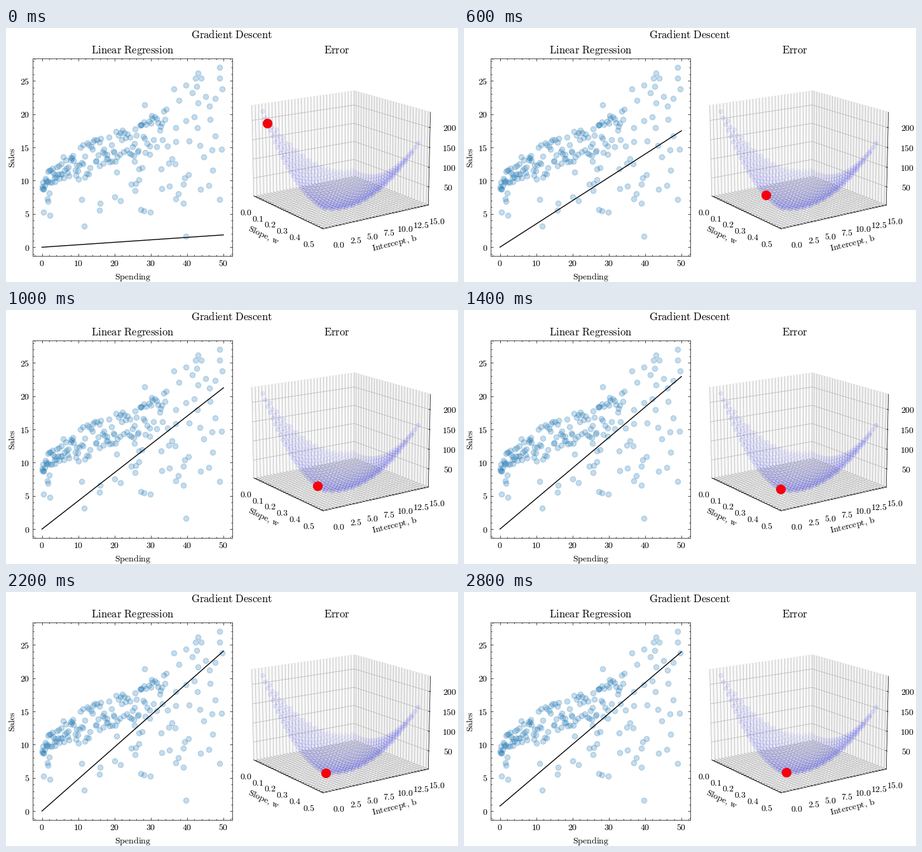
Recreate the animation shown at these times as a matplotlib script. Size 711x400 px, loop 3 s.

```python
import numpy as np
import matplotlib.pyplot as plt
from matplotlib.animation import FuncAnimation
from matplotlib.collections import LineCollection
from matplotlib.patches import Polygon
from matplotlib.ticker import AutoMinorLocator, MultipleLocator

W, H, DPI = 711, 400, 100
plt.rcParams.update({
    "mathtext.fontset": "cm", "font.size": 10, "axes.titlesize": 12,
    "axes.linewidth": 0.5, "lines.linewidth": 1,
    "xtick.direction": "in", "ytick.direction": "in",
    "xtick.top": True, "ytick.right": True,
    "xtick.major.size": 3, "ytick.major.size": 3,
    "xtick.minor.size": 1.5, "ytick.minor.size": 1.5,
    "xtick.major.width": 0.5, "ytick.major.width": 0.5,
    "xtick.minor.width": 0.5, "ytick.minor.width": 0.5,
})


def tex(s):
    s = s.replace(", ", r",\,").replace(" ", r"\ ")
    return rf"$\mathrm{{{s}}}$"


# --- model: moments of the data and gradient descent ---
MX, MY, VX = 23.264, 14.022, 219.3
SLOPE, CUT, NOISE = 0.2025, 9.312, 18.1
MXX = VX + MX ** 2
MXY = SLOPE * MXX + CUT * MX
RATE = 1e-4


def loss(w, b):
    return NOISE + (w - SLOPE) ** 2 * VX + (MY - w * MX - b) ** 2


def descend(epochs):
    w = b = 0.0
    path = []
    for i in range(max(epochs) + 1):
        dw, db = MXY - w * MXX - b * MX, MY - w * MX - b
        w, b = w + RATE * dw, b + RATE * db
        if i in epochs:
            path.append((w, b))
    return path


path = descend([*range(0, 60, 5), 1000, 2000, 3000])

fig = plt.figure(figsize=(W / DPI, H / DPI), dpi=DPI, facecolor="white")
fig.text(0.5, 384 / H, tex("Gradient Descent"), size=12, ha="center", va="baseline")

# --- left: scatter and fitted line ---
ax = fig.add_axes([42.3 / W, 40.6 / H, 314 / W, 311.2 / H])
ax.set(xlim=(-2.5, 52.5), ylim=(-1.35, 28.35))
ax.set_title(tex("Linear Regression"))
ax.set_xlabel(tex("Spending"))
ax.set_ylabel(tex("Sales"))
for axis, step in ((ax.xaxis, 10), (ax.yaxis, 5)):
    axis.set_major_locator(MultipleLocator(step))
    axis.set_minor_locator(AutoMinorLocator(5))
    axis.set_major_formatter(lambda v, _: tex(f"{v:g}"))

sparse = np.array([
    (48.9, 7.2), (2.1, 4.8), (15.9, 5.6), (28.1, 5.5), (33, 8.8), (1.6, 6.9),
    (29.9, 5.3), (11, 7.2), (.4, 5.3), (16, 6.6), (21.7, 7), (38.9, 6.6),
    (39.6, 1.6), (27.2, 5.7), (11.6, 3.2), (36.9, 7.3), (37.6, 8), (20.1, 7.6),
    (43.7, 8.7), (35.1, 9.2), (39.3, 10.4), (45.9, 9.3), (25.7, 8.5), (26.7, 10.1),
    (24.6, 9.5), (25.9, 9.6), (39, 9.5), (40.3, 10.9), (47, 11.6), (32.8, 11.8),
    (36.6, 12.5), (35, 12.6), (26.7, 11.8), (27.5, 12), (25.5, 12.9), (20.5, 11.3),
    (1.5, 7.3), (2, 8.1), (0, 8.8), (35.8, 13.3), (44.5, 13.6), (49.4, 14.7),
    (46.8, 14.6), (43.5, 15.3), (40.6, 16), (47.8, 16.7), (48.9, 27), (43, 26.2),
    (49, 25.4), (43.8, 25.4), (42.3, 25.4), (49.6, 23.8), (39.6, 24.4), (42.7, 24.2),
    (36.3, 23.8), (41.5, 23.2), (47.7, 22.4), (45.1, 22.6), (37.8, 22.1), (46.2, 21.2),
    (43, 21.7), (34.3, 20.7), (28.3, 21.4), (46.4, 19.2), (42, 19.6), (39.7, 19),
    (42.8, 18), (36.8, 18), (36.9, 15.9), (34.6, 15.2), (28.5, 14.2), (29.6, 14),
])
rng = np.random.default_rng(4)
n = 128
bx = 34 * ((np.arange(n) + rng.random(n)) / n) ** 1.15
by = 9 + 1.9 * np.sqrt(bx) - np.minimum(1.5 + 0.35 * bx, 5) * rng.random(n) ** 1.4
by += 0.04 * np.maximum(bx - 22, 0)
ax.scatter(np.r_[sparse[:, 0], bx], np.r_[sparse[:, 1], by],
           s=36, color="#1f77b4", alpha=0.25, linewidths=1)
fit, = ax.plot([], [], color="black", lw=1, zorder=3)

# --- right: error surface in perspective, drawn in pixels ---
stage = fig.add_axes([0, 0, 1, 1])
stage.set(xlim=(0, W), ylim=(H, 0))
stage.axis("off")
fig.text(520.8 / W, (400 - 39.8) / H, tex("Error"), size=12, ha="center", va="baseline")

AZIM, ELEV = np.radians(-35), np.radians(15)
HX, HZ = 0.5953, 0.4464          # half sizes of the box


def view(x, y, z):
    side = y * np.cos(AZIM) - x * np.sin(AZIM)
    ahead = x * np.cos(AZIM) + y * np.sin(AZIM)
    near = ahead * np.cos(ELEV) + z * np.sin(ELEV)
    s = 1676 / (10 - near)
    up = z * np.cos(ELEV) - ahead * np.sin(ELEV)
    return 525 + s * side, 200 - s * up, near


gw, gb = (g.ravel() for g in np.meshgrid(np.arange(25) * 0.02, np.arange(15.0)))
gz = loss(gw, gb)


def scaler(v, half):
    pad = (0.05 + 1.1 / 48) * np.ptp(v)
    lo, hi = v.min() - pad, v.max() + pad
    return lambda t: (2 * (t - lo) / (hi - lo) - 1) * half


sw, sb, sz = scaler(gw, HX), scaler(gb, HX), scaler(gz, HZ)


def place(w, b, z):
    return view(sw(w), sb(b), sz(z))


def seg(*pts):
    return [view(*p)[:2] for p in pts]


def lines(segs, color, z):
    stage.add_collection(LineCollection(segs, colors=color, linewidths=0.5, zorder=z))


panes = [
    (0.95, [(-HX, -HX, -HZ), (-HX, HX, -HZ), (-HX, HX, HZ), (-HX, -HX, HZ)]),
    (0.90, [(-HX, HX, -HZ), (HX, HX, -HZ), (HX, HX, HZ), (-HX, HX, HZ)]),
    (0.925, [(-HX, -HX, -HZ), (HX, -HX, -HZ), (HX, HX, -HZ), (-HX, HX, -HZ)]),
]
for g, corners in panes:
    stage.add_patch(Polygon(seg(*corners), fc=(g, g, g, 0.5), ec=(g, g, g, 0.5),
                            lw=1, zorder=1))

OUT, IN, GAP = 0.01, 0.02, 0.129
grid, ticks = [], []
for x in sw(np.arange(-1, 26) * 0.02):
    grid.append(seg((x, -HX, -HZ), (x, HX, -HZ), (x, HX, HZ)))
    ticks.append(seg((x, -HX - OUT, -HZ), (x, -HX + IN, -HZ)))
for y in sb(np.arange(-2, 31) * 0.5):
    grid.append(seg((HX, y, -HZ), (-HX, y, -HZ), (-HX, y, HZ)))
    ticks.append(seg((HX + OUT, y, -HZ), (HX - IN, y, -HZ)))
for z in sz(np.arange(50, 201, 50)):
    grid.append(seg((-HX, -HX, z), (-HX, HX, z), (HX, HX, z)))
    ticks.append(seg((HX + OUT, HX, z), (HX - IN, HX, z)))
edges = [seg((-HX, -HX, -HZ), (HX, -HX, -HZ), (HX, HX, -HZ), (HX, HX, HZ))]
lines(grid, "#b0b0b0", 2)
lines(ticks + edges, "black", 3)


def label(x, y, s, angle=0):
    stage.text(x, y, tex(s), ha="center", va="center", rotation=angle)


for w in np.arange(6) * 0.1:
    label(*view(sw(w), -HX - GAP, -HZ - GAP)[:2], f"{w:.1f}")
for b in np.arange(7) * 2.5:
    label(*view(HX + GAP, sb(b), -HZ - GAP)[:2], f"{b:.1f}")
for z in range(50, 201, 50):
    label(*view(HX + GAP, HX + GAP, sz(z))[:2], str(z))
label(405, 327, "Slope, w", -25.5)
label(611, 339.5, "Intercept, b", 13.5)

px, py, near = place(gw, gb, gz)
order = np.argsort(near)
rgba = np.zeros((len(near), 4))
rgba[:, 2] = 1
rgba[:, 3] = 0.1 * (0.3 + 0.7 * (near - near.min()) / np.ptp(near))
stage.scatter(px[order], py[order], s=20, c=rgba[order], edgecolors="face",
              linewidths=1, zorder=4)
ball = stage.scatter([0], [0], s=100, color="#f5000c", linewidths=1, zorder=5)


def draw(i):
    w, b = path[i]
    fit.set_data([0, 50], [b, b + 50 * w])
    ball.set_offsets([place(w, b, loss(w, b))[:2]])
    return fit, ball


anim = FuncAnimation(fig, draw, frames=len(path), interval=200, repeat=True,
                     repeat_delay=0, init_func=lambda: draw(0))
plt.show()
```
